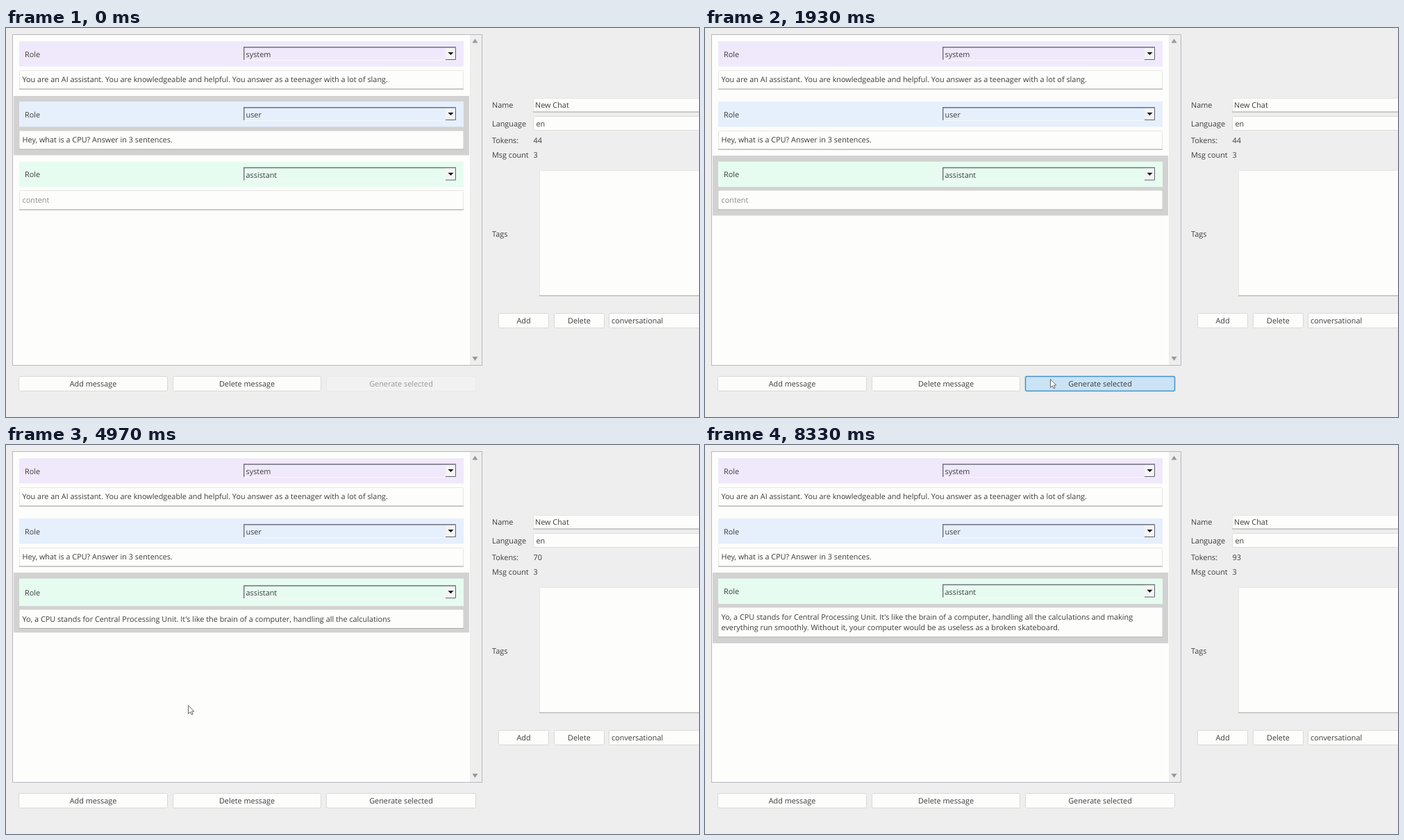
Write an HTML page that moves like this. It is 998 by 561 pixels and loops after 8.36 s.

```html
<!DOCTYPE html>
<html lang="en">
<head>
<meta charset="utf-8">
<title>Chat editor</title>
<style>
  html, body { margin: 0; width: 100%; height: 100%; overflow: hidden; background: #eee; }
  svg { display: block; width: 998px; height: 561px; }
  text { font: 10.86px "Open Sans", "Noto Sans", sans-serif; fill: #3c3c3c; text-rendering: geometricPrecision; white-space: pre; }
  .mid { text-anchor: middle; }
  .dim { fill: #8c8c8c; }
  .off rect { fill: #f2f2f2; stroke: #e9e9e9; }
  .off text { fill: #989898; }
  .hover rect { fill: #e5f1fb; stroke: #4a9bd6; }
  .down rect { fill: #cae3f5; stroke: #4393ca; stroke-width: 1.5; }
</style>
</head>
<body>
<svg id="stage" viewBox="0 0 998 561"></svg>
<script>
const LOOP = 8360;
const PRESS = 1860, RELEASE = 2010;
const SELECT = 680;
const TYPE_START = 3280, TYPE_STEP = 73;
const LINES = [
  "Yo, a CPU stands for Central Processing Unit. It's like the brain of a computer, handling all the calculations and making",
  "everything run smoothly. Without it, your computer would be as useless as a broken skateboard."
].map(line => line.match(/ ?\w+|'s|[.,]/g));
const WORDS = LINES.flat().length;

// Pointer stops: time, x, y
const PATH = [
  [60, 998, 320], [520, 420, 243], [720, 415, 243], [1100, 357, 324], [1260, 357, 324],
  [1780, 497, 506], [2080, 497, 506], [2510, 262, 375], [7700, 262, 375], [8250, 998, 330]
];

const stage = document.getElementById("stage");

function add(parent, tag, attrs, content = "") {
  const el = document.createElementNS("http://www.w3.org/2000/svg", tag);
  set(el, attrs);
  el.textContent = content;
  return parent.appendChild(el);
}
function set(el, attrs) {
  for (const key in attrs) el.setAttribute(key, attrs[key]);
}
const rect = (p, x, y, width, height, fill, more) => add(p, "rect", { x, y, width, height, fill, ...more });
const path = (p, d, fill, stroke = "none") => add(p, "path", { d, fill, stroke });
const label = (p, x, y, s, cls = "") => add(p, "text", { x, y: y + 4, class: cls }, s);
const show = (el, on) => el.setAttribute("visibility", on ? "visible" : "hidden");

function field(p, x, y, w, h) {
  const box = rect(p, x + .5, y + .5, w, h, "#fdfdfc", { stroke: "#e6e6e4", rx: 1 });
  const line = path(p, `M${x} ${y + h}h${w + 1}`, "none", "#a2a2a2");
  return { box, line };
}
function button(x, y, w, h, s) {
  const g = add(stage, "g", {});
  rect(g, x + .5, y + .5, w, h, "#fdfdfc", { stroke: "#d9d9d7", rx: 2 });
  label(g, x + w / 2 + .5, y + h / 2 + .5, s, "mid");
  return g;
}
function header(y, color, role) {
  const g = add(stage, "g", {});
  const bar = rect(g, 19, y, 640, 36.5, color);
  const controls = add(g, "g", {});
  label(controls, 27, y + 18.5, "Role");
  set(path(controls, `M342.7 ${y + 27}v-18.2h305.3`, "none", "#71717c"), { "stroke-width": 1.4 });
  path(controls, `M343 ${y + 27.5}h289`, "none", "#f8f8f8");
  rect(controls, 633, y + 10, 14, 16, "#f4f4f4");
  path(controls, `M633 ${y + 26.5}h14.5v-17`, "none", "#62626c");
  path(controls, `M636.5 ${y + 16}h8l-4 4z`, "#111");
  label(controls, 345.5, y + 18.8, role);
  return { bar, controls };
}

rect(stage, 0, 0, 998, 561, "#eee");

// Message list
rect(stage, 9.5, 9.5, 676, 477, "#fdfdfc", { stroke: "#b8b8be" });
rect(stage, 668, 10, 17, 476, "#eee");
path(stage, "M671.5 21.5h8l-4-6z", "#999");
path(stage, "M671.5 474h8l-4 6z", "#999");

const mark = rect(stage, 11, 98, 656, 85.5, "#d2d2d2");
header(19, "#f0e8fb", "system");
field(stage, 19, 61, 639, 27);
label(stage, 23.5, 73.5, "You are an AI assistant. You are knowledgeable and helpful. You answer as a teenager with a lot of slang.");
header(106, "#e6effc", "user");
field(stage, 19, 148, 639, 27);
label(stage, 23.5, 160.5, "Hey, what is a CPU? Answer in 3 sentences.");
const reply = header(192.7, "#e7fcf0", "assistant");
const answer = field(stage, 19, 234, 639, 28);
const hint = label(stage, 23.5, 247.5, "content", "dim");
const rows = [0, 1].map(i => label(stage, 23.5, 247.5 + i * 15.5, ""));

button(18, 502, 214, 21, "Add message");
button(240, 502, 213, 21, "Delete message");
const generate = button(461, 502, 215, 21, "Generate selected");

// Chat properties
label(stage, 700, 111, "Name");
field(stage, 759, 101, 245, 20);
label(stage, 762, 111, "New Chat");
label(stage, 700, 138, "Language");
rect(stage, 759.5, 127.5, 245, 20, "#fdfdfc", { stroke: "#dcdcda", rx: 2 });
label(stage, 763.5, 138, "en");
label(stage, 700, 161.5, "Tokens:");
const tokens = label(stage, 759.5, 161.5, "44");
label(stage, 700, 183, "Msg count");
label(stage, 759.5, 183, "3");
label(stage, 700, 296.5, "Tags");
field(stage, 768, 205, 240, 181);
button(709, 411, 72, 21, "Add");
button(789, 411, 72, 21, "Delete");
rect(stage, 868.5, 411.5, 140, 21, "#fdfdfc", { stroke: "#d9d9d7", rx: 2 });
label(stage, 872, 422, "conversational");

const pointer = path(stage, "M.5.5v12l2.8-2.5 2 4 1.9-.9-2-3.9h3.6z", "#fff", "#666");

function pointerAt(t) {
  const i = PATH.findIndex(stop => stop[0] > t);
  if (i < 1) return null;
  const [t0, x0, y0] = PATH[i - 1], [t1, x1, y1] = PATH[i];
  const u = (t - t0) / (t1 - t0), k = u * u * (3 - 2 * u);
  return [x0 + (x1 - x0) * k, y0 + (y1 - y0) * k];
}

function draw(t) {
  const count = Math.max(0, Math.min(WORDS, Math.floor((t - TYPE_START) / TYPE_STEP)));
  const first = LINES[0].length;
  const wrapped = count > first, single = count > 0 && !wrapped;
  const shift = single ? 1.5 : 0;

  rows[0].textContent = LINES[0].slice(0, count).join("");
  rows[1].textContent = LINES[1].slice(0, Math.max(0, count - first)).join("");
  rows[0].setAttribute("y", single ? 254.5 : 251.5);
  show(hint, !count);
  tokens.textContent = 44 + Math.round(count * 49 / WORDS);

  const top = single ? 237 : 234, bottom = wrapped ? 277 : single ? 264.5 : 262;
  set(answer.box, { y: top + .5, height: bottom - top });
  set(answer.line, { d: `M19 ${bottom}h640` });
  set(reply.bar, { height: single ? 39.5 : 36.5 });
  set(reply.controls, { transform: `translate(0 ${shift})` });

  const selected = t >= SELECT;
  set(mark, {
    y: selected ? 184 : 98,
    height: wrapped ? 102 : selected ? 86.5 : 85.5,
    fill: selected && t < PRESS ? "#c8e5fb" : "#d2d2d2"
  });

  const at = pointerAt(t);
  show(pointer, at);
  if (at) set(pointer, { transform: `translate(${at})` });
  const over = at && at[0] > 461 && at[0] < 677 && at[1] > 502 && at[1] < 524;
  set(generate, { class: !selected ? "off" : t >= PRESS && t < RELEASE ? "down" : over ? "hover" : "" });
}

const start = performance.now();
function tick() {
  draw((performance.now() - start) % LOOP);
  requestAnimationFrame(tick);
}
tick();
</script>
</body>
</html>
```
